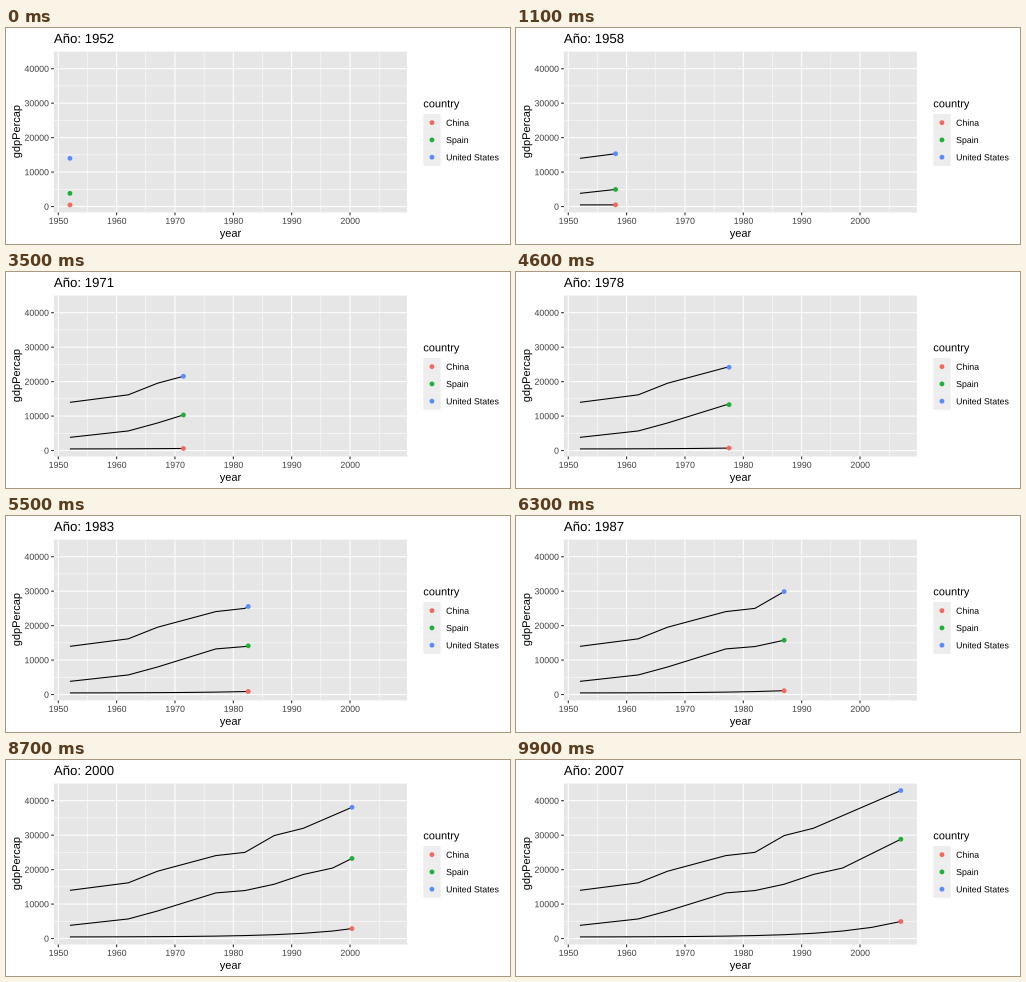
Recreate the animation shown at these times as a matplotlib script. Size 504x216 px, loop 10 s.

```python
import numpy as np
import matplotlib.pyplot as plt
from matplotlib.animation import FuncAnimation
from matplotlib.patches import Circle, PathPatch, Rectangle
from matplotlib.textpath import TextPath
from matplotlib.transforms import Affine2D

plt.rcParams.update({
    "font.family": "Liberation Sans",
    "path.snap": False,
    "lines.solid_capstyle": "butt",
    "toolbar": "None",
})

W, H = 504, 216
FRAMES, INTERVAL = 100, 100
LEFT, TOP, RIGHT, BOTTOM = 47.9, 23.2, 400.9, 184.5
LINE, THIN = 1.07, 0.53
START, END = 1952, 2007
STEP = 5


def trend(*points):
    """Piecewise linear curve through (year, thousands) turning points."""
    xs, ys = zip(*points)
    return lambda year: 1000 * np.interp(year, xs, ys)


def growth(base, gain, ratio):
    """Exponential rise that reaches base + gain in the last year."""
    return lambda year: base + gain * ratio ** ((END - year) / STEP)


countries = {
    "China": ("#f5665d", growth(450, 4500, 0.62)),
    "Spain": ("#1db034", trend(
        (1952, 3.83), (1962, 5.69), (1967, 7.99), (1977, 13.24), (1982, 13.93),
        (1987, 15.76), (1992, 18.60), (1997, 20.45), (2007, 28.82))),
    "United States": ("#588bff", trend(
        (1952, 13.99), (1962, 16.17), (1967, 19.53), (1977, 24.07),
        (1982, 25.01), (1987, 29.88), (1992, 32.00), (2007, 42.95))),
}


def expand(lo, hi):
    pad = 0.05 * (hi - lo)
    return lo - pad, hi + pad


X0, X1 = expand(START, END)
Y0, Y1 = expand(400, 42952)


def px(year):
    return LEFT + (year - X0) / (X1 - X0) * (RIGHT - LEFT)


def py(value):
    return BOTTOM - (value - Y0) / (Y1 - Y0) * (BOTTOM - TOP)


# At 72 dpi one point is one pixel, so all sizes below are pixels.
fig = plt.figure(figsize=(W / 72, H / 72), dpi=72, facecolor="white")
ax = fig.add_axes([0, 0, 1, 1])
ax.set_xlim(0, W)
ax.set_ylim(H, 0)
ax.axis("off")


def box(x, y, w, h, color):
    ax.add_patch(Rectangle((x, y), w, h, fc=color, ec="none", zorder=0))


def stroke(xs, ys, color, width, z=1):
    return ax.plot(xs, ys, color=color, lw=width, zorder=z)[0]


def dot(x, y, color):
    return ax.add_patch(Circle((x, y), 2.4, fc=color, ec="none", zorder=5))


def outline(x, y, text, size, align=0, angle=0):
    """Text as a path, so that glyphs keep fractional positions."""
    path = TextPath((0, 0), text, size=size)
    shift = -align * path.get_extents().x1
    place = Affine2D().translate(shift, 0).scale(1, -1)
    return place.rotate_deg(angle).translate(x, y).transform_path(path)


def label(x, y, text, size=8.8, color="black", **kw):
    patch = PathPatch(outline(x, y, text, size, **kw), fc=color, ec="none",
                      zorder=6)
    return ax.add_patch(patch)


def draw_panel():
    box(LEFT, TOP, RIGHT - LEFT, BOTTOM - TOP, "#e6e6e6")
    for year in range(1955, 2006, 10):
        stroke([px(year)] * 2, [TOP, BOTTOM], "white", THIN)
    for value in range(5000, 45001, 10000):
        stroke([LEFT, RIGHT], [py(value)] * 2, "white", THIN)
    for year in range(1950, 2001, 10):
        x = px(year)
        stroke([x, x], [TOP, BOTTOM], "white", LINE)
        stroke([x, x], [BOTTOM, BOTTOM + 2.75], "#2b2b2b", LINE)
        label(x, 195.9, str(year), color="#3f3f3f", align=0.5)
    for value in range(0, 40001, 10000):
        y = py(value)
        stroke([LEFT, RIGHT], [y, y], "white", LINE)
        stroke([LEFT - 2.75, LEFT], [y, y], "#2b2b2b", LINE)
        label(LEFT - 5.3, y + 3.15, str(value), color="#3f3f3f", align=1)
    label((LEFT + RIGHT) / 2, 208.8, "year", 11, align=0.5)
    label(13.9, (TOP + BOTTOM) / 2, "gdpPercap", 11, align=0.5, angle=-90)


def draw_legend(x=417.3, y=86, key=17.28):
    label(x, 79.3, "country", 11)
    for k, (name, (color, _)) in enumerate(countries.items()):
        mid = y + (k + 0.5) * key
        box(x, mid - key / 2, key, key, "#ededed")
        dot(x + key / 2, mid, color)
        label(x + key + 5.5, mid + 3.15, name)


draw_panel()
draw_legend()
title = label(LEFT, 15, "Año", 13.2)
series = [(curve, stroke([], [], "black", LINE, 3), dot(0, 0, color))
          for color, curve in countries.values()]


def update(i):
    now = START + (END - START) * i / (FRAMES - 1)
    title.set_path(outline(LEFT, 15, f"Año: {round(now)}", 13.2))
    knots = np.arange(START, END + 1, STEP)
    shown = np.append(knots[knots < now], now)
    for curve, line, head in series:
        values = np.interp(shown, knots, curve(knots))
        line.set_data(px(shown), py(values))
        head.center = px(now), py(values[-1])
    return [title] + [artist for s in series for artist in s[1:]]


anim = FuncAnimation(fig, update, frames=FRAMES, interval=INTERVAL,
                     repeat=True, repeat_delay=0, blit=False)
plt.show()
```
